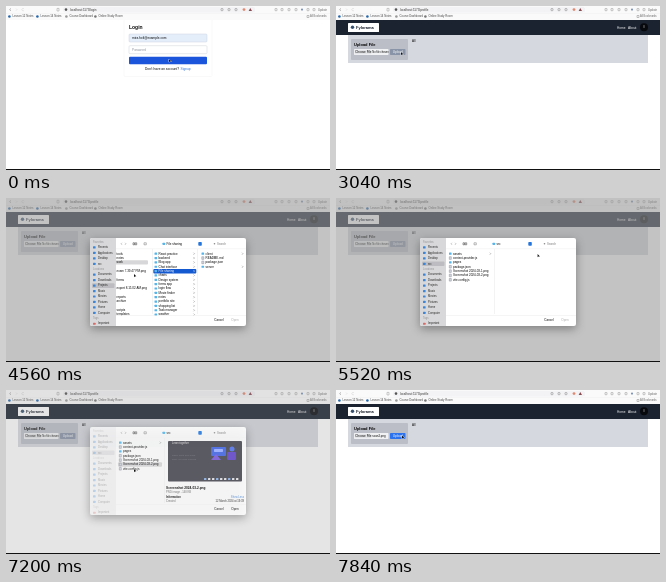
These frames come from a looping animation (324x164 px, 8 s). An HTML page with a canvas:

```html
<!DOCTYPE html>
<html lang="en">
<head>
<meta charset="utf-8">
<title>Upload flow</title>
<style>
  html, body { margin: 0; width: 100%; height: 100%; overflow: hidden; background: #fff; }
  canvas { display: block; width: 324px; height: 164px; }
</style>
</head>
<body>
<canvas id="stage"></canvas>
<script>
const LOOP = 8000, W = 324, H = 164;
const canvas = document.getElementById('stage');
const ratio = window.devicePixelRatio || 1;
canvas.width = W * ratio;
canvas.height = H * ratio;
const ctx = canvas.getContext('2d');

const clamp = v => Math.max(0, Math.min(1, v));
const ramp = (t, from, to) => clamp((t - from) / (to - from));
const smooth = p => p * p * (3 - 2 * p);

function rect(x, y, w, h, fill, radius = 0, stroke) {
  ctx.beginPath();
  ctx.roundRect(x, y, w, h, radius);
  if (fill) { ctx.fillStyle = fill; ctx.fill(); }
  if (stroke) { ctx.strokeStyle = stroke; ctx.lineWidth = 0.5; ctx.stroke(); }
}

function dot(x, y, r, fill) {
  ctx.beginPath();
  ctx.arc(x, y, r, 0, 7);
  ctx.fillStyle = fill;
  ctx.fill();
}

function poly(points, fill) {
  ctx.beginPath();
  points.forEach(([x, y]) => ctx.lineTo(x, y));
  ctx.closePath();
  ctx.fillStyle = fill;
  ctx.fill();
}

function line(points, color, width = 0.5) {
  ctx.beginPath();
  points.forEach(([x, y]) => ctx.lineTo(x, y));
  ctx.strokeStyle = color;
  ctx.lineWidth = width;
  ctx.stroke();
}

function text(s, x, y, size, color = '#000', bold = false, align = 'left') {
  ctx.font = `${bold ? 'bold ' : ''}${size}px "Liberation Sans", Arial, sans-serif`;
  ctx.textAlign = align;
  ctx.textBaseline = 'middle';
  ctx.fillStyle = color;
  ctx.fillText(s, x, y);
}

const chevron = (x, y, color) => line([[x, y - 1], [x + 1, y], [x, y + 1]], color);

function browser(url) {
  rect(0, 0, W, 14, '#fafafb');
  rect(57, 0.8, 192, 5.6, '#f3f3f5', 2.5);
  line([[5, 2.4], [3.6, 3.6], [5, 4.8]], '#777');
  chevron(10, 3.6, '#ccc');
  ctx.beginPath();
  ctx.arc(17, 3.6, 1.2, 0.5, 5.8);
  ctx.stroke();
  rect(51, 2.4, 2, 2.6, null, 0, '#999');
  dot(60, 3.6, 1.3, '#555');
  text(url, 64, 3.8, 3, '#333');
  [216, 223, 230].forEach(x => rect(x - 1, 2.5, 2, 2.2, null, 0.6, '#777'));
  dot(238, 3.6, 1.4, '#e08a72');
  poly([[242.6, 5], [246, 5], [244.3, 2]], '#8a4a52');
  [270, 276, 283, 290, 302, 308].forEach(x => rect(x - 1, 2.5, 2, 2.2, null, 0.4, '#888'));
  dot(296, 3.6, 1.1, '#8195b8');
  text('Update', 312, 3.8, 2.8, '#666');
  line([[0, 7.5], [W, 7.5]], '#eee');
  [['Lesson 12 Notes', 2, '#2466a8'], ['Lesson 14 Notes', 30, '#2466a8'],
   ['Course Dashboard', 59, '#999'], ['Online Study Room', 88, '#777']].forEach(([label, x, color]) => {
    dot(x + 1.4, 10.5, 1.3, color);
    text(label, x + 4.5, 10.7, 2.8, '#444');
  });
  rect(301, 9.5, 2, 2, null, 0, '#888');
  text('All Bookmarks', 304, 10.7, 2.6, '#666');
}

function loginPage() {
  rect(118, 13.5, 88, 57, '#fff', 1, '#f2f2f4');
  browser('localhost:5173/login');
  text('Login', 123, 21.8, 5, '#111', true);
  rect(123, 28, 78, 8, '#e4eefa', 1, '#c8d2df');
  text('mira.holt@example.com', 126, 32, 3.2);
  rect(123, 39.7, 78, 8, '#fff', 1, '#cfd2d8');
  text('Password', 126, 43.8, 3.2, '#8b909a');
  rect(123, 50.7, 78, 7.6, '#1b55dc', 1);
  text("Don't have an account?", 139, 63.6, 3.25);
  text('Signup', 174.5, 63.6, 3.25, '#2b6fd6');
}

function uploadPage(chosen, hover) {
  browser('localhost:5173/profile');
  rect(0, 14, W, 15, '#1b2330');
  rect(12, 17, 31, 9, '#fff', 0.5);
  dot(16.5, 21.3, 1.7, '#35506f');
  text('Fylorama', 20, 21.5, 4, '#151b26', true);
  text('Home', 281, 21.8, 3.2, '#fff');
  text('About', 292, 21.8, 3.2, '#fff');
  dot(308, 21.3, 4, '#07090d');
  text('M', 308, 21.5, 3, '#777', false, 'center');
  rect(12, 29, 300, 28, '#d5d8df');
  rect(15, 33, 57, 21, '#bbbec7', 1);
  text('Upload File', 18, 38.5, 4, '#000', true);
  rect(18, 43, 34.5, 6, '#f1f2f4', 0.7);
  rect(18.8, 43.8, 16.5, 4.4, '#e3e4e7', 0.6);
  text('Choose File', 19.3, 46, 3.05);
  text(chosen ? 'scan2.png' : 'No file chosen', 36.3, 46, chosen ? 2.9 : 2.6);
  rect(54, 43, 15.5, 6, hover ? '#2d73ef' : '#8994a8', 0.7);
  text('Upload', 61.7, 46, 3.2, '#fff', false, 'center');
  text('All', 76, 35, 3);
}

const SIDEBAR = ['Favorites', 'Recents', 'Applications', 'Desktop', 'src', 'Locations', 'Documents',
  'Downloads', 'Projects', 'Music', 'Movies', 'Pictures', 'Home', 'Computer', 'Tags', 'Important'];
const PARENT = ['tools', 'notes', 'work', '', 'exam 7.39.47 PM.png', '', 'forms', '', 'export 8.15.02 AM.png',
  '', 'reports', 'archive', '', 'scripts', 'templates'];
const FOLDERS = ['React practice', 'backend', 'Blog app', 'Chat interface', 'File sharing', 'charts', 'Design system',
  'forms app', 'login flow', 'Movie finder', 'notes', 'portfolio site', 'shopping list', 'Task manager', 'weather'];
const PROJECT = ['client', 'README.md', 'package.json', 'server'];
const FILES = ['assets', 'context-provider.js', 'pages', 'package.json', 'Screenshot 2024-03-1.png',
  'Screenshot 2024-03-2.png', 'vite.config.js'];
const rowY = i => 55.7 + i * 4.35;

function fileRow(name, x, i, { folder = false, color = '#000' } = {}) {
  const y = rowY(i);
  if (folder) rect(x, y - 1.1, 2.6, 2.2, '#55b4ea', 0.4);
  else rect(x + 0.3, y - 1.3, 2, 2.6, '#d6dce2', 0, '#889');
  text(name, x + 4, y, 3, color);
}

function sidebar(selected) {
  rect(84, 40, 26, 88, '#d8d8da', [2, 0, 0, 2]);
  SIDEBAR.forEach((name, i) => {
    const y = 44 + i * 5.45;
    if (i === 0 || i === 5 || i === 14) return text(name, 87, y, 2.6, '#929296');
    if (i === selected) rect(86, y - 2.3, 22.5, 4.6, '#bdbdc1', 1);
    rect(87, y - 1.1, 2.6, 2.2, i === 15 ? '#d66b64' : '#3b86d9', 0.5);
    text(name, 92, y, 2.7, '#222');
  });
}

function columnView() {
  [146.5, 191.5].forEach(x => line([[x, 51], [x, 116]], '#e6e6e6'));
  rect(110, rowY(2) - 2.1, 32, 4.2, '#d7d7d9', [0, 1, 1, 0]);
  PARENT.forEach((name, i) => text(name, 110.5, rowY(i), 3));
  rect(147.3, rowY(4) - 2.1, 43, 4.4, '#1459d0', 1);
  FOLDERS.forEach((name, i) => {
    const color = i === 4 ? '#fff' : '#000';
    fileRow(name, 148.5, i, { folder: true, color });
    chevron(187.5, rowY(i), i === 4 ? '#fff' : '#777');
  });
  PROJECT.forEach((name, i) => {
    const folder = i % 3 === 0;
    fileRow(name, 195.5, i, { folder });
    if (folder) chevron(236, rowY(i), '#777');
  });
}

function preview() {
  rect(162, 54, 74, 40.5, '#46474f', 1);
  text('Learn together', 166, 56.4, 2.6, '#fff');
  rect(205, 60, 15, 9, '#5577f2', 1);
  rect(208, 62, 9, 3, '#a9b9ff', 0.7);
  rect(221, 65, 9, 8, '#7357d8', 1);
  dot(226, 62, 2.5, '#6485fa');
  poly([[205, 73], [210, 67], [215, 73]], '#8a6be6');
  text('Read, write and share', 166, 68, 2.4, '#85868e');
  text('what you have learned', 166, 72, 2.4, '#85868e');
  for (let i = 0; i < 9; i++) rect(198 + i * 4, 91, 2.4, 2, i % 3 ? '#f2f2f4' : '#9cc0f5', 0.5);
  text('Screenshot 2024-03-2.png', 160, 101.6, 3.2, '#000', true);
  text('PNG image - 148 KB', 160, 105.6, 2.7, '#666');
  text('Information', 160, 110.3, 2.7, '#111', true);
  text('Show Less', 238, 110.3, 2.7, '#4c87d4', false, 'right');
  text('Created', 160, 114.6, 2.7, '#666');
  text('12 March 2024 at 19:39', 238, 114.6, 2.7, '#222', false, 'right');
}

function fileView(selected) {
  line([[158.5, 51], [158.5, 116]], '#e6e6e6');
  if (selected) rect(112, rowY(5) - 2.1, 44, 4.3, '#d2d2d5', 1);
  FILES.forEach((name, i) => fileRow(name, 113, i, { folder: i === 0 || i === 2 }));
  chevron(153.8, rowY(0), '#777');
  if (selected) preview();
}

function dialog(t) {
  const inFiles = t >= 5440, selected = t >= 6880;
  const opening = smooth(ramp(t, 3680, 3850));
  const closing = ramp(t, 7120, 7360) ** 2;
  const slide = 3 * (1 - smooth(ramp(t, 3920, 4320))) + 3 * ramp(t, 7080, 7160);
  ctx.save();
  ctx.globalAlpha = opening * (1 - closing);
  ctx.translate(0, -slide);
  ctx.shadowColor = 'rgba(0,0,0,.35)';
  ctx.shadowBlur = 10 * ratio;
  ctx.shadowOffsetY = 3 * ratio;
  rect(84, 40, 156, 88, '#fff', 2);
  ctx.shadowColor = 'transparent';

  // The sidebar loses its tint before the sheet itself disappears.
  ctx.save();
  ctx.globalAlpha *= 1 - ramp(t, 7120, 7240);
  sidebar(inFiles ? 4 : 8);
  ctx.restore();

  chevron(119, 45.8, '#888');
  line([[116, 44.8], [115, 45.8], [116, 46.8]], '#888');
  [127, 129.2].forEach(x => rect(x, 44.8, 1.5, 2, null, 0, '#333'));
  rect(138, 44.8, 2.3, 2, null, 0, '#777');
  rect(156.5, 44.8, 2.6, 2.2, '#55b4ea', 0.4);
  text(inFiles ? 'src' : 'File sharing', 160.5, 46, 3);
  rect(192.3, 44, 3.5, 3.7, '#2476dc', 0.8);
  dot(208.5, 45.8, 0.8, '#888');
  text('Search', 211, 46, 2.9, '#777');
  line([[110, 50.7], [240, 50.7]], '#eee');

  if (inFiles) fileView(selected); else columnView();

  line([[110, 117.5], [240, 117.5]], '#eaeaea');
  text('Cancel', 213, 122, 3, '#000', false, 'center');
  text('Open', 229, 122, 3, selected ? '#000' : '#aaa', false, 'center');
  ctx.restore();
}

// Pointer stops: time, x, y
const POINTER = [[0, 163, 53], [1920, 163, 53], [2720, 65, 46], [3120, 65, 46], [3600, 29, 46], [3760, 29, 46],
  [4480, 128, 76], [4720, 128, 76], [5120, 205, 55], [5440, 205, 55], [6080, 128, 80], [7200, 128, 79], [7760, 66, 45.5]];

function pointer(t) {
  const next = POINTER.findIndex(stop => stop[0] > t);
  const b = POINTER[next < 0 ? POINTER.length - 1 : next];
  const a = next < 0 ? b : POINTER[next - 1];
  const p = next < 0 ? 1 : smooth(ramp(t, a[0], b[0]));
  const x = a[1] + (b[1] - a[1]) * p, y = a[2] + (b[2] - a[2]) * p;
  const shape = [[x, y], [x, y + 3.2], [x + 0.8, y + 2.5], [x + 2.3, y + 2.3]];
  line([...shape, shape[0]], '#fff', 0.7);
  poly(shape, '#111');
}

function draw(t) {
  ctx.setTransform(ratio, 0, 0, ratio, 0, 0);
  rect(0, 0, W, H, '#fff');
  if (t < 1920) loginPage(); else uploadPage(t >= 7440, t >= 7680);
  rect(0, 163, W, 1, '#111');
  if (t >= 3680 && t < 7440) {
    const wash = 0.59 * ramp(t, 3700, 4030) * (1 - ramp(t, 7080, 7290));
    rect(0, 0, W, 163, `rgba(153,153,153,${wash})`);
    dialog(t);
  }
  pointer(t);
}

const start = performance.now();
function tick() {
  draw((performance.now() - start) % LOOP);
  requestAnimationFrame(tick);
}
tick();
</script>
</body>
</html>
```
